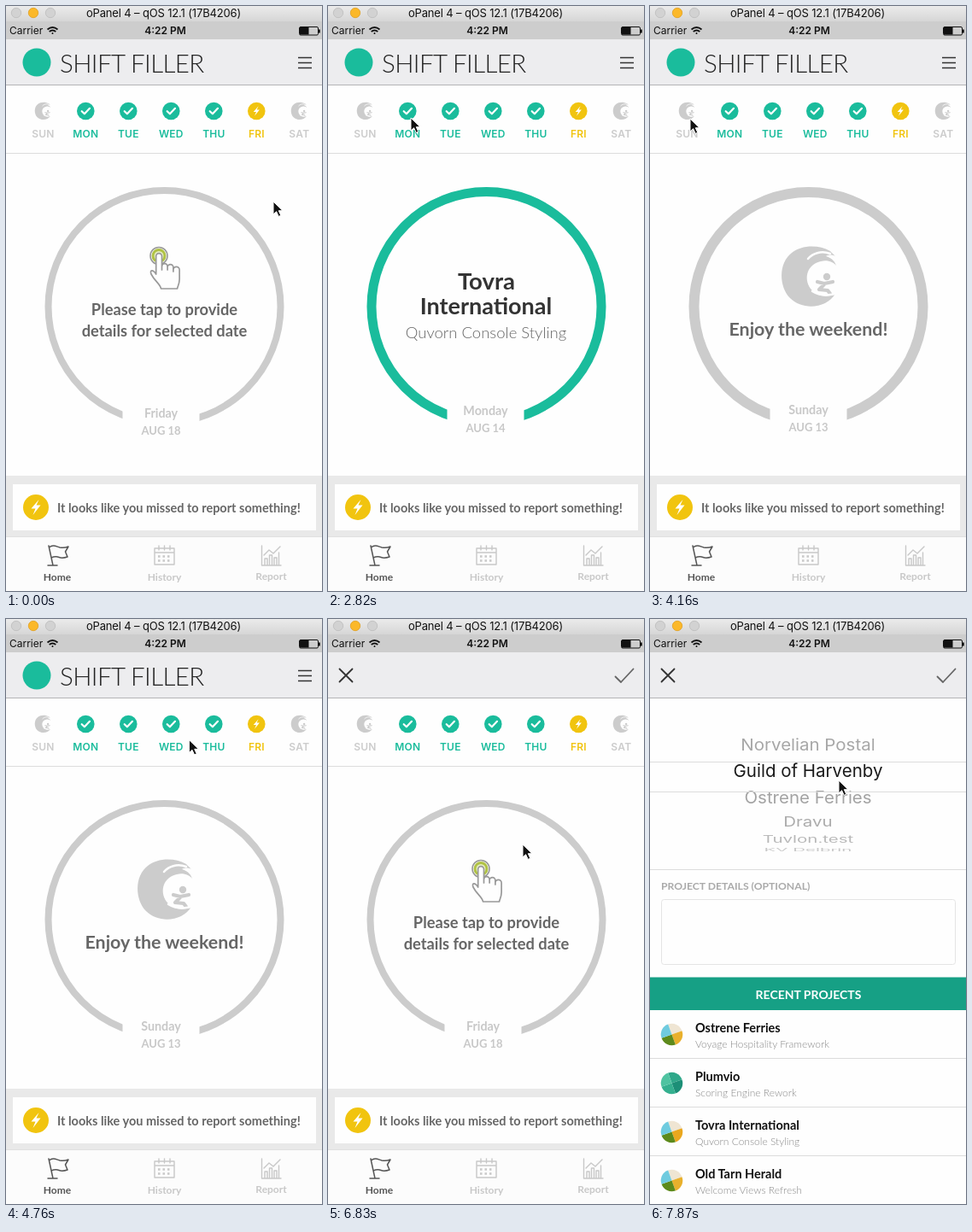
Recreate the animation shown at these times as an HTML page. Size 370x685 px, loop 8 s.

```html
<!DOCTYPE html>
<html lang="en">
<head>
<meta charset="utf-8">
<title>Shift Filler</title>
<style>
html, body { margin: 0; width: 100%; height: 100%; overflow: hidden; background: #fefefe; }
svg { display: block; width: 100vw; height: 100vh; }
text { font-family: Lato, sans-serif; fill: #666; }
.ui { font-family: Inter, sans-serif; fill: #111; }
.mid { text-anchor: middle; }
.light { font-weight: 300; }
.bold { font-weight: 700; }
.line { fill: none; stroke-linecap: round; stroke-linejoin: round; }
.tab { font-size: 12px; font-weight: 700; }
</style>
</head>
<body>
<svg id="stage" viewBox="0 0 370 685" xmlns="http://www.w3.org/2000/svg">
  <defs>
    <linearGradient id="bar" x2="0" y2="1">
      <stop stop-color="#ebebeb"/><stop offset="1" stop-color="#d6d6d6"/>
    </linearGradient>
    <path id="bolt" d="M3.500-9-5.500 1.500H-.5L-3.500 9 5.500-2.500H.5Z" fill="#fff"/>
    <g id="surf">
      <path fill="#ccc" d="M24-30C10-38-10-37-21-28C-37-16-36 12-23 25C-8 40 20 37 30 20C20 25 8 23 1 14C-8 1-2-15 13-18C21-20 28-17 31-13C29-19 25-22 19-24C22-26 27-26 30-24Z"/>
      <path class="line" stroke="#fefefe" stroke-width="2.500" d="M24-27C13-31 3-27-2-21"/>
      <circle cx="20" cy="0" r="4.200" fill="#ccc"/>
      <path class="line" stroke="#ccc" stroke-width="4.200" d="M9 6 17 8 27 6M17 9 11 15 21 16 24 20"/>
      <path class="line" stroke="#fefefe" stroke-width="2.500" d="M3 17Q14 24 30 20"/>
    </g>
  </defs>

  <rect width="370" height="685" fill="#fefefe"/>

  <g id="home">
    <path d="M0 172.500H370" stroke="#dcdcdc"/>
    <g id="days"></g>

    <circle id="ring" cx="185.500" cy="352" fill="none"/>
    <g id="label">
      <rect x="136.500" y="456" width="90" height="54" fill="#fefefe"/>
      <g class="mid bold">
        <text id="dayName" x="181.500" y="482" font-size="14.300" style="fill:#c8c8c8"></text>
        <text id="dayDate" x="181.500" y="502" font-size="13" style="fill:#c8c8c8"></text>
      </g>
    </g>

    <g id="tapView" class="mid bold" font-size="18.300">
      <circle cx="179" cy="292.500" r="10" fill="#fefefe" stroke="#999" stroke-width="1.600"/>
      <circle cx="179" cy="292.500" r="7" fill="#e4ecc0" stroke="#b0c244" stroke-width="3"/>
      <path class="line" style="fill:#fefefe" stroke="#999" stroke-width="1.700" d="M175.700 314V293a3.400 3.400 0 0 1 6.800 0V309V305a3.300 3.300 0 0 1 6.600 0V309V306a3.400 3.400 0 0 1 6.800 0V311V309a3.600 3.600 0 0 1 7.200 0V320C203 326 201 328 200.500 331H181.500C181 326 174 322 170 314C168 309 172 308 175.700 314Z"/>
      <text x="185.500" y="362">Please tap to provide</text>
      <text x="185.500" y="387">details for selected date</text>
    </g>
    <g id="workView" class="mid">
      <text class="bold" x="185.500" y="332" font-size="27.500" style="fill:#333">Tovra</text>
      <text class="bold" x="185" y="361" font-size="27" style="fill:#333">International</text>
      <text class="light" x="185" y="389" font-size="18.500">Quvorn Console Styling</text>
    </g>
    <g id="restView" class="mid">
      <use href="#surf" x="187" y="317"/>
      <text class="bold" x="185.500" y="386" font-size="21.400">Enjoy the weekend!</text>
    </g>

    <rect y="550" width="370" height="71" fill="#e9e9e9"/>
    <rect x="8" y="560" width="355" height="54" fill="#fefefe"/>
    <circle cx="35" cy="587" r="15" fill="#f1c40f"/>
    <use href="#bolt" x="35" y="587"/>
    <text class="bold" x="60" y="593" font-size="14.500">It looks like you missed to report something!</text>

    <rect y="621" width="370" height="64" fill="#fcfcfc"/>
    <path d="M0 621.500H370" stroke="#e0e0e0"/>
    <path class="line" stroke="#555" stroke-width="1.500" d="M50 632 55 655M49 655H60M50.500 634C55 630 59 633 63 634Q68 635 73 633L69.500 639 72 645Q66 647 62 645.500T53 646"/>
    <g class="line" stroke="#c8c8c8" stroke-width="1.400">
      <path d="M174 635H197V654H174ZM174 640H197M179 632V637M185.500 632V637M192 632V637"/>
      <path stroke-width="2.600" stroke-dasharray="2.500 3" stroke-linecap="butt" d="M178 644.500H194M178 649.500H194"/>
      <path d="M299.500 632V655H322M303 655V647H306V655M308.500 655V643H311.500V655M314 655V646H317V655M319.500 655V640M302 643 308 637 313 641 321 633"/>
    </g>
    <g class="mid tab">
      <text x="60" y="673" style="fill:#555">Home</text>
      <text x="185.500" y="673" style="fill:#c8c8c8">History</text>
      <text x="310.500" y="672" style="fill:#c8c8c8">Report</text>
    </g>
  </g>

  <g id="form">
    <rect y="93" width="370" height="592" fill="#fefefe"/>
    <g id="wheel" class="mid"></g>
    <path d="M0 167.500H370M0 202.500H370M0 293.500H370" stroke="#dcdcdc"/>
    <text class="bold" x="13" y="317" font-size="12.200" style="fill:#aaa">PROJECT DETAILS (OPTIONAL)</text>
    <rect x="13.500" y="328.500" width="344" height="76" rx="3" fill="#fefefe" stroke="#e4e4e4"/>
    <rect y="419.500" width="370" height="38.500" fill="#16a085"/>
    <text class="mid bold" x="185.500" y="445" font-size="14" style="fill:#fff">RECENT PROJECTS</text>
    <g id="rows"></g>
  </g>

  <rect y="39" width="370" height="53" fill="#ededef"/>
  <path d="M0 92.500H370" stroke="#b4b4b6"/>
  <g id="homeHead">
    <circle cx="36" cy="66" r="16.500" fill="#1abc9c"/>
    <text class="light" x="63" y="77.500" font-size="29.500" letter-spacing="-.6" style="fill:#222">SHIFT FILLER</text>
    <path d="M342 60.500H358M342 66.500H358M342 72.500H358" stroke="#333" stroke-width="1.500"/>
  </g>
  <g id="formHead" class="line">
    <path d="M13.500 58.500 28.500 73.500M28.500 58.500 13.500 73.500" stroke="#333" stroke-width="1.800"/>
    <path d="M336.500 67.500 343 74 357.500 58.500" stroke="#666" stroke-width="1.800"/>
  </g>

  <rect width="370" height="18" fill="url(#bar)"/>
  <g fill="#d2d2d2" stroke="#bdbdbd" stroke-width=".8">
    <circle cx="12" cy="8" r="5.700"/>
    <circle cx="32" cy="8" r="5.700" fill="#fbb829" stroke="#e0a020"/>
    <circle cx="52" cy="8" r="5.700"/>
  </g>
  <text class="ui mid" x="184.500" y="13" font-size="13" letter-spacing="-.15">oPanel 4 – qOS 12.1 (17B4206)</text>
  <rect y="18" width="370" height="21" fill="#cdcdcd"/>
  <text class="ui" x="4" y="33" font-size="12">Carrier</text>
  <text class="ui mid" x="186.500" y="33" font-size="12" font-weight="600">4:22 PM</text>
  <g class="line" stroke="#111" stroke-width="1.800">
    <path d="M48.500 27.500Q54.500 22.500 60.500 27.500M50.700 30Q54.500 27 58.300 30" style="stroke-linecap:butt"/>
    <circle cx="54.500" cy="32" r="1" style="fill:#111" stroke="none"/>
  </g>
  <rect x="343.500" y="24.500" width="22" height="9.500" rx="1.500" fill="none" stroke="#111"/>
  <path d="M344 25H354.500V33.500H344ZM366 27.500H367.800V31.500H366Z" fill="#111"/>

  <path id="cursor" d="M0 0V15L3.600 11.700 6.200 17.400 8.800 16.200 6.300 10.700H11Z" fill="#111" stroke="#fff" stroke-width="1"/>
</svg>

<script>
const $ = id => document.getElementById(id);
const clamp = v => Math.max(0, Math.min(1, v));
const smooth = v => (v = clamp(v), v * v * (3 - 2 * v));

const LOOP = 8000, STEP = 148, LAST = 53;
const GREEN = '#1abc9c', YELLOW = '#f1c40f', GREY = '#ccc';

// Week strip
$('days').innerHTML = ['SUN', 'MON', 'TUE', 'WED', 'THU', 'FRI', 'SAT'].map((name, i) => {
  const off = i % 6 === 0, color = off ? GREY : i === 5 ? YELLOW : GREEN;
  const mark = off ? '<use href="#surf" transform="scale(.29)"/>'
    : `<circle r="10.300" fill="${color}"/>` + (i === 5
      ? '<use href="#bolt" transform="scale(.65)"/>'
      : '<path class="line" d="M-4.600 .2-1.400 3.300 4.700-3.200" stroke="#fff" stroke-width="2.200"/>');
  return `<g transform="translate(${43.3 + 50 * i} 123)">${mark}
    <text class="ui mid" y="31" font-size="12" font-weight="600" letter-spacing=".2" style="fill:${color}">${name}</text></g>`;
}).join('');
const pressed = $('days').children[3];

// Recent projects: title, subtitle, badge colours clockwise from the top
const projects = [
  ['Ostrene Ferries', 'Voyage Hospitality Framework', '#efe5d3', '#e9b02c', '#5d8a1c', '#6fcbdf'],
  ['Plumvio', 'Scoring Engine Rework', '#2fa88a', '#1c8f77', '#35b08f', '#4fc3a1'],
  ['Tovra International', 'Quvorn Console Styling', '#efe5d3', '#eaa71e', '#5d8a1c', '#6fcbdf'],
  ['Old Tarn Herald', 'Welcome Views Refresh', '#efe5d3', '#e9b02c', '#5d8a1c', '#6fcbdf']
];
$('rows').innerHTML = projects.map(([title, sub, ...colors], i) => {
  const y = 57 * i;
  const wedges = colors.map((c, k) =>
    `<path transform="rotate(${25 + 90 * k})" d="M0 0-9-9A12.700 12.700 0 0 1 9-9Z" fill="${c}"/>`).join('');
  return `<g transform="translate(25.500 ${486.5 + y})">${wedges}</g>
    <text class="bold" x="53" y="${484 + y}" font-size="14.500" style="fill:#111">${title}</text>
    <text class="light" x="53" y="${502 + y}" font-size="12" style="fill:#888">${sub}</text>
    <path d="M0 ${514.5 + y}H370" stroke="#dcdcdc"/>`;
}).join('');

const clients = ['Norvelian Postal', 'Guild of Harvenby', 'Ostrene Ferries', 'Dravu', 'Tuvlon.test', 'KV Delbrin'];
$('wheel').innerHTML = clients.map(c => `<text class="ui" y="7" font-size="20.500">${c}</text>`).join('');
const items = [...$('wheel').children];

// Selected day: first step shown, step at which the ring is thickest
const picks = [
  { from: 0, peak: -9, view: 'tap', day: 'Friday', date: 'AUG 18' },
  { from: 11, peak: 11, view: 'work', day: 'Wednesday', date: 'AUG 16' },
  { from: 19, peak: 18, view: 'work', day: 'Monday', date: 'AUG 14' },
  { from: 27, peak: 28, view: 'rest', day: 'Sunday', date: 'AUG 13' },
  { from: 38, peak: 38, view: 'tap', day: 'Friday', date: 'AUG 18' }
];

// Pointer moves: start step, end step, target
const start = [313, 229];
const moves = [
  [1, 7, 196, 131], [11, 17, 97, 131], [19, 24, 47, 132], [28, 34, 273, 145],
  [34, 36, 285, 138], [38, 43, 228, 264], [47, 52, 221, 189]
];

function pointer(n) {
  let [x, y] = start;
  for (const [a, b, tx, ty] of moves) {
    const k = smooth((n - a) / (b - a));
    x += (tx - x) * k;
    y += (ty - y) * k;
  }
  return [x, y];
}

function drawRing(n) {
  const pick = picks.filter(p => n >= p.from).pop();
  const grow = 4 * clamp(1 - (n - pick.peak) / 4), width = 8 + grow;
  $('ring').setAttribute('r', 140 - width / 2);
  $('ring').setAttribute('stroke-width', width);
  $('ring').setAttribute('stroke', pick.view === 'work' ? GREEN : GREY);
  $('label').setAttribute('transform', `translate(${grow} ${-grow})`);
  $('dayName').textContent = pick.day;
  $('dayDate').textContent = pick.date;
  for (const v of ['tap', 'work', 'rest'])
    $(v + 'View').style.display = v === pick.view ? '' : 'none';
}

function drawWheel(n) {
  const scroll = 1.225 * smooth((n - 48) / 5);
  items.forEach((item, i) => {
    const angle = (i - scroll) * .355, c = Math.cos(angle);
    item.style.display = c > .1 && Math.abs(angle) < 1.5 ? '' : 'none';
    item.style.fill = Math.abs(angle) < .2 ? '#1a1a1a' : '#a2a2a2';
    item.style.opacity = .45 + .55 * c;
    item.setAttribute('transform', `translate(185 ${185 + 88 * Math.sin(angle)}) scale(1 ${c})`);
  });
}

function draw(now) {
  const n = Math.min(LAST, Math.floor(now % LOOP / STEP));
  const head = clamp((n - 44) / 2);
  drawRing(n);
  drawWheel(n);
  pressed.style.opacity = n === 10 ? .8 : 1;
  $('homeHead').style.opacity = 1 - head;
  $('formHead').style.opacity = head;
  $('form').style.opacity = clamp((n - 46) / 3);
  $('cursor').setAttribute('transform', `translate(${pointer(n)})`);
}

const began = performance.now();
function tick() {
  draw(performance.now() - began);
  requestAnimationFrame(tick);
}
tick();
</script>
</body>
</html>
```
